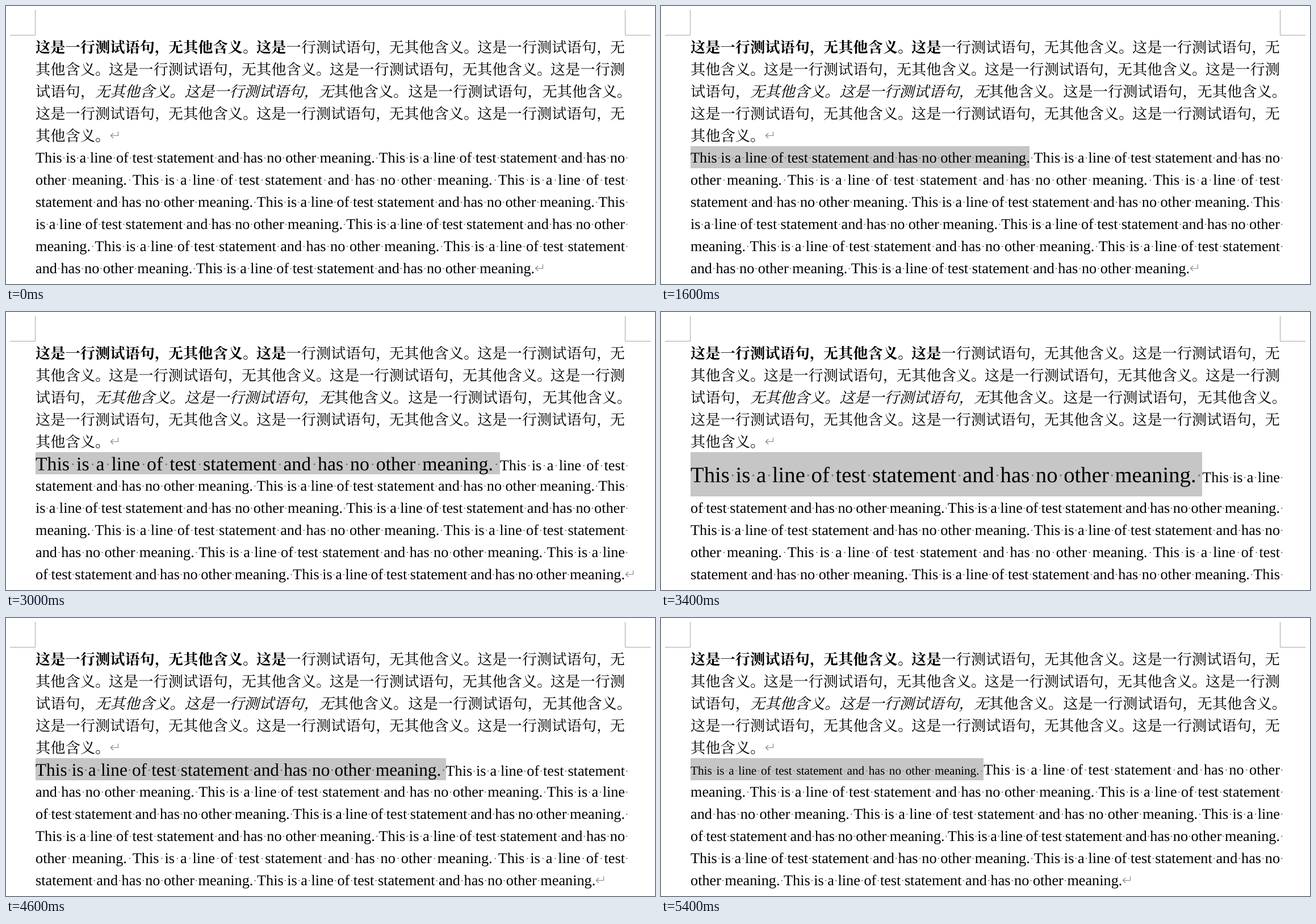
An HTML page for the animation above (6400 ms loop, 1143 px wide and 490 px high).

```html
<!DOCTYPE html>
<html lang="zh-CN">
<head>
<meta charset="utf-8">
<title>Font size</title>
<style>
  html, body { margin: 0; width: 100%; height: 100%; overflow: hidden; background: #fff; }
  svg { display: block; width: 100vw; height: 100vh; }
  text { fill: #000; text-rendering: geometricPrecision; white-space: pre; }
  .zh { font: 300 26.25px "Noto Serif CJK SC", "Noto Sans CJK SC", "Noto Sans CJK", serif; }
  .bold { font-weight: 700; }
  .italic { font-style: italic; }
  .en { font-family: "Liberation Serif", "Times New Roman", serif; }
  .dot { fill: #777; }
  .mark { fill: none; stroke: #858585; stroke-width: 1.2; }
  .corner { fill: none; stroke: #a6a6a6; }
  .page { visibility: hidden; }
</style>
</head>
<body>
<svg id="stage" viewBox="0 0 1143 490">
  <path class="corner" d="M7 51.5H51.5V7M1135 51.5H1090.5V7"/>
  <rect id="sel" x="52" y="247" width="0" height="39" fill="#c6c6c6"/>
  <rect id="caret" x="230" y="253" width="1" height="29" visibility="hidden"/>
</svg>
<script>
const LEFT = 52, WIDTH = 1038, ROW = 39, BASE = 26.25, PT = 2.5;
const ZH_TOP = 52, EN_TOP = 247, LOOP = 6400;
const stage = document.getElementById('stage');
const sel = document.getElementById('sel');
const caret = document.getElementById('caret');

function add(parent, tag, attrs, text) {
  const el = document.createElementNS('http://www.w3.org/2000/svg', tag);
  for (const key in attrs) el.setAttribute(key, attrs[key]);
  if (text) el.textContent = text;
  return parent.appendChild(el);
}

function returnMark(parent, x, top) {
  add(parent, 'path', {
    class: 'mark',
    d: 'M15 -7V0H2M6.5 -4.5L2 0L6.5 4.5',
    transform: `translate(${Math.round(x) - 0.5} ${top + 20.5})`
  });
}

// Chinese paragraph: 40 characters a row, punctuation squeezed to fit
function drawChinese() {
  const text = '这是一行测试语句，无其他含义。'.repeat(11);
  const isPunct = c => '，。'.includes(c);
  const styleAt = i => i < 17 ? 'zh bold' : i >= 84 && i < 100 ? 'zh italic' : 'zh';
  for (let row = 0, start = 0; start < text.length; row++, start += 40) {
    const chars = [...text.slice(start, start + 40)];
    const top = ZH_TOP + row * ROW;
    const excess = Math.max(0, chars.length * BASE - WIDTH);
    const hangs = isPunct(chars[chars.length - 1]);
    const squeeze = hangs ? 0 : excess / chars.filter(isPunct).length;
    let x = LEFT, run = null;
    chars.forEach((c, i) => {
      const style = styleAt(start + i);
      if (!run || run.style !== style) {
        run = { style, xs: [], text: '', el: add(stage, 'text', { class: style, y: top + 30 }) };
      }
      run.xs.push(x.toFixed(2));
      run.text += c;
      run.el.textContent = run.text;
      run.el.setAttribute('x', run.xs.join(' '));
      x += BASE - (isPunct(c) ? squeeze : 0);
    });
    if (chars.length < 40) returnMark(stage, x, top);
  }
}

const pen = document.createElement('canvas').getContext('2d');
pen.font = '1000px "Liberation Serif", "Times New Roman", serif';
const em = s => pen.measureText(s).width / 1000;
const SPACE = em(' ');
const sentence = 'This is a line of test statement and has no other meaning.'.split(' ');
const words = Array.from({ length: 10 }, () => sentence).flat();

// Greedy wrap; a word may squeeze in if that costs less than half the stretch
function wrap(size) {
  const lines = [];
  let line = null;
  words.forEach((text, i) => {
    const s = i < sentence.length ? size : BASE;
    const word = { i, text, s, w: em(text) * s, gap: SPACE * s };
    if (line) {
      const next = line.w + line.gap + word.w;
      if (next - WIDTH <= (WIDTH - line.w) / 2) {
        line.spaces += line.gap;
        line.w = next;
        line.gap = word.gap;
        line.words.push(word);
        return;
      }
    }
    line = { words: [word], w: word.w, gap: word.gap, spaces: 0 };
    lines.push(line);
  });
  return lines;
}

function drawEnglish(size) {
  const g = add(stage, 'g', { class: 'page' });
  const page = { g, end: 0, height: ROW };
  const lines = wrap(size);
  let top = EN_TOP;
  lines.forEach((line, n) => {
    const big = Math.max(BASE, n ? BASE : size);
    const height = Math.ceil(big * 1.107 / ROW) * ROW;
    const y = top + Math.round(height / 2 + 0.3375 * big + 0.64);
    const last = n === lines.length - 1;
    const k = last && line.w <= WIDTH ? 1 : 1 + (WIDTH - line.w) / line.spaces;
    let x = LEFT;
    line.words.forEach((word, j) => {
      const atEnd = j === line.words.length - 1;
      if (word.i === sentence.length) page.end = Math.round(x);
      add(g, 'text', { class: 'en', x: x.toFixed(2), y, 'font-size': word.s }, word.text);
      x += word.w;
      if (atEnd && last) return;
      const gap = word.gap * (atEnd ? 1 : k);
      add(g, 'circle', {
        class: 'dot', cx: (x + gap / 2).toFixed(2), cy: (y - 0.31 * word.s).toFixed(2), r: 0.046 * word.s
      });
      x += gap;
    });
    if (last) returnMark(g, x, top);
    if (!n) page.height = height;
    top += height;
  });
  return page;
}

drawChinese();

// [start ms, size in points, selection edge (0 = none, -1 = whole sentence)]
const steps = [
  [0, 10.5, 0], [800, 10.5, 231], [1000, 10.5, 472], [1200, 10.5, 644],
  [1600, 10.5, 649], [1800, 10.5, 656],
  [2600, 11.5, -1], [2800, 12.5, -1], [3000, 13.5, -1], [3200, 14.5, -1], [3400, 15.5, -1],
  [4000, 14.5, -1], [4200, 13.5, -1], [4600, 12.5, -1], [4800, 11.5, -1],
  [5000, 10.5, 656], [5200, 9.5, -1], [5400, 8.5, -1]
];
const pages = {};
for (const [, pt] of steps) pages[pt] = pages[pt] || drawEnglish(pt * PT);
stage.appendChild(caret);

let shown = null;
const began = performance.now();
function tick() {
  const t = (performance.now() - began) % LOOP;
  const [, pt, edge] = steps.filter(s => s[0] <= t).pop();
  const page = pages[pt];
  if (page !== shown) {
    if (shown) shown.g.style.visibility = 'hidden';
    page.g.style.visibility = 'visible';
    shown = page;
  }
  const right = edge < 0 ? page.end : edge;
  sel.setAttribute('width', Math.max(0, right - LEFT));
  sel.setAttribute('height', page.height);
  caret.setAttribute('visibility', t >= 200 && t < 400 ? 'visible' : 'hidden');
  requestAnimationFrame(tick);
}
tick();
</script>
</body>
</html>
```
